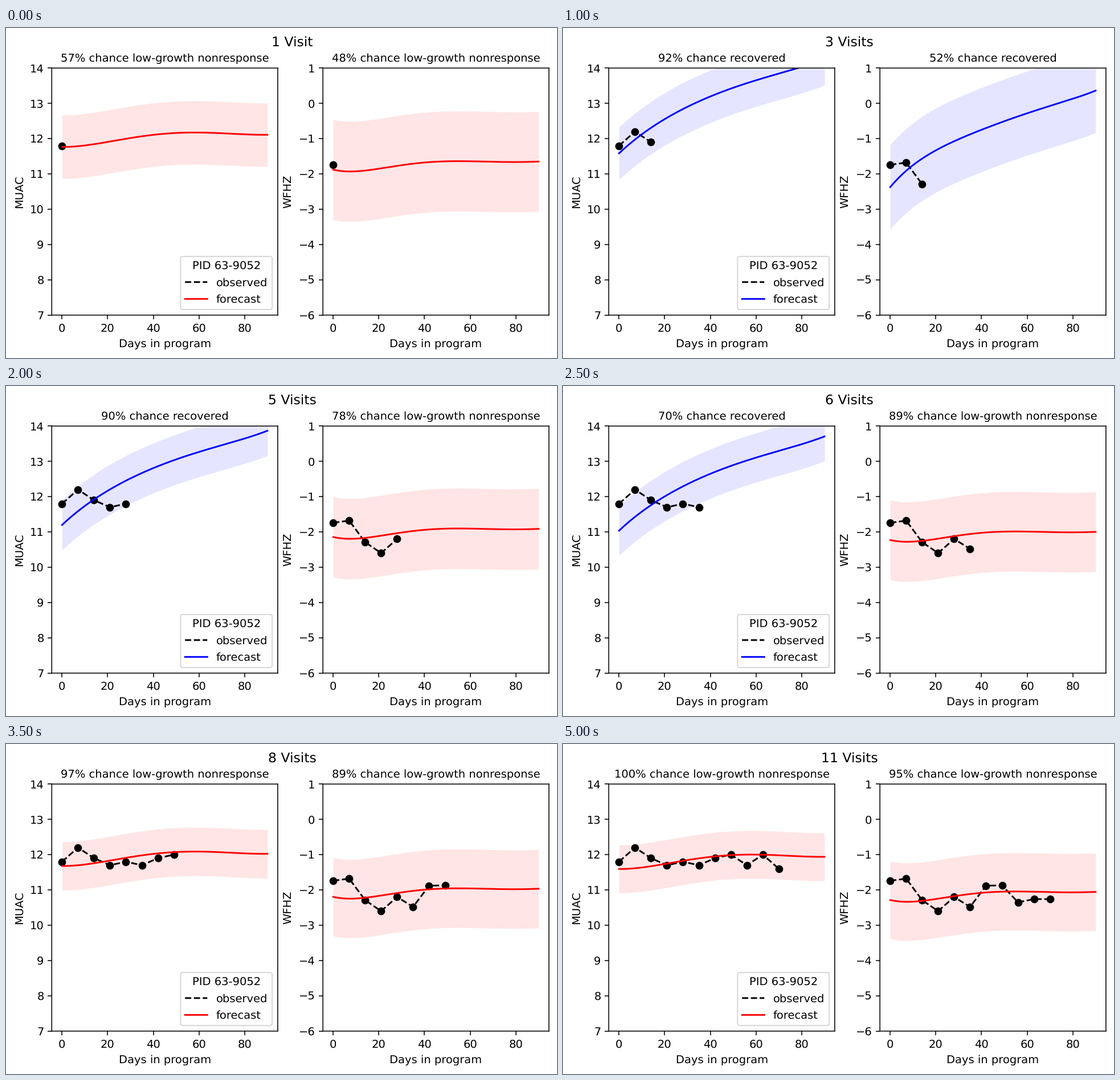
A matplotlib script that plays this animation: 967 by 579 pixels, repeating every 5500 ms.

```python
import numpy as np
import matplotlib.pyplot as plt
from matplotlib.animation import FuncAnimation
from numpy.polynomial import Polynomial

W, H, DPI = 967, 579, 140.7
AX_W, AX_H, TOP = 396.6, 433.4, 70.3
CENTER = 502.6

plt.rcParams.update({
    "font.family": "DejaVu Sans",
    "font.size": 10,
    "axes.titlesize": 10,
    "axes.labelpad": 4.6,
    "xtick.major.pad": 3.8,
    "text.hinting": "none",
    "path.snap": False,
})

DAYS = np.linspace(0, 90, 181)
KEY_DAYS = (0, 10, 30, 60, 80, 90)
GROW, STALL = "recovered", "low-growth nonresponse"
COLORS = {GROW: "blue", STALL: "red"}


def profile(*gains):
    """Smooth gain since admission, passing through the key days."""
    return Polynomial.fit(KEY_DAYS, gains, len(KEY_DAYS) - 1)


class Panel:
    """Observed visits of one measure with its updated forecast."""

    def __init__(self, left, label, ylim, observed, chances, last_grow,
                 profiles, prior, variance):
        self.ax = fig.add_axes([left / W, 1 - (TOP + AX_H) / H, AX_W / W, AX_H / H])
        self.ax.set(xlim=(-4.5, 94.5), ylim=ylim, xlabel="Days in program",
                    ylabel=label, xticks=range(0, 81, 20),
                    yticks=range(ylim[0], ylim[1] + 1))
        self.observed = np.array(observed)
        self.chances = chances
        self.last_grow = last_grow
        self.profiles = profiles
        self.prior = prior
        self.variance = variance
        self.dots = self.ax.scatter([], [], color="k")
        self.path, = self.ax.plot([], [], "k--", label="observed")
        self.line, = self.ax.plot([], [], label="forecast")
        self.band = None

    def forecast(self, days, seen):
        n = len(seen)
        outcome = GROW if 2 <= n <= self.last_grow else STALL
        gain = self.profiles[outcome]
        start = np.mean(seen - gain(days)) + self.prior / n
        between, within = self.variance
        return outcome, start + gain(DAYS), np.sqrt(between + within / n)

    def show(self, visits):
        days, seen = 7 * np.arange(visits), self.observed[:visits]
        outcome, mean, half = self.forecast(days, seen)
        color = COLORS[outcome]
        self.dots.set_offsets(np.column_stack([days, seen]))
        self.path.set_data(days, seen)
        self.line.set_data(DAYS, mean)
        self.line.set_color(color)
        if self.band is not None:
            self.band.remove()
        self.band = self.ax.fill_between(DAYS, mean - half, mean + half,
                                         color=color, alpha=0.1, lw=0, zorder=0.9)
        self.ax.set_title(f"{self.chances[visits - 1]}% chance {outcome}")
        return color


fig = plt.figure(figsize=((W + 1e-6) / DPI, (H + 1e-6) / DPI), dpi=DPI,
                 facecolor="white")

muac = Panel(
    80.3, "MUAC", (7, 14),
    observed=[11.8, 12.2, 11.9, 11.7, 11.8, 11.7, 11.9, 12, 11.7, 12, 11.6],
    chances=[57, 81, 92, 96, 90, 70, 71, 97, 100, 100, 100],
    last_grow=6,
    profiles={GROW: profile(0, .54, 1.32, 2.07, 2.45, 2.67),
              STALL: profile(0, .042, .253, .408, .357, .345)},
    prior=-0.035, variance=(0.425, 0.385))

wfhz = Panel(
    556.2, "WFHZ", (-6, 1),
    observed=[-1.74, -1.68, -2.29, -2.6, -2.2, -2.48, -1.88, -1.87, -2.35,
              -2.26, -2.26],
    chances=[48, 66, 52, 61, 78, 89, 88, 89, 90, 93, 95],
    last_grow=3,
    profiles={GROW: profile(0, .623, 1.358, 2.093, 2.505, 2.735),
              STALL: profile(0, -.046, .128, .239, .217, .231)},
    prior=-0.14, variance=(1.127, 0.889))

legend = muac.ax.legend(handles=[muac.path, muac.line], title="PID 63-9052",
                        loc="lower right", labelspacing=0.57)
heading = fig.text(CENTER / W, 1 - 14.1 / H, "", size=12, ha="center", va="top")


def update(i):
    visits = i + 1
    heading.set_text(f"{visits} Visit" + "s" * (visits > 1))
    legend.get_lines()[1].set_color(muac.show(visits))
    wfhz.show(visits)
    return []


anim = FuncAnimation(fig, update, frames=len(muac.observed), interval=500,
                     repeat=True, repeat_delay=0, blit=False)
plt.show()
```
